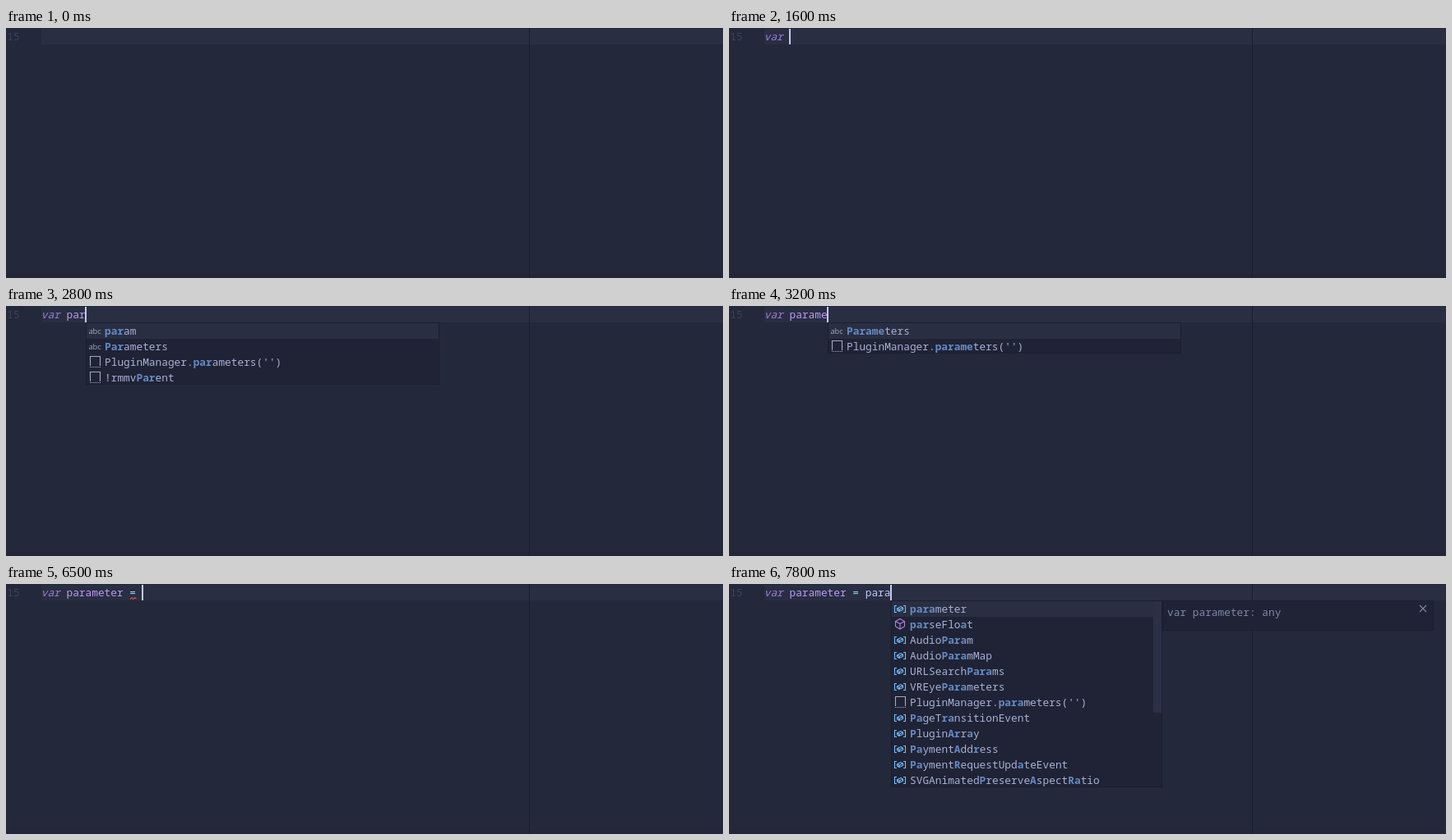
Write an HTML page that moves like this. It is 872 px wide and 305 px high and loops after 8000 ms.

```html
<!DOCTYPE html>
<html lang="en">
<head>
<meta charset="utf-8">
<title>Editor autocomplete</title>
<style>
  html, body { margin: 0; width: 100%; height: 100%; overflow: hidden; background: #24283b; }
  svg { display: block; }
  text { font: 12.82px "Noto Sans Mono", "DejaVu Sans Mono", monospace; white-space: pre; fill: #a9b1d6; }
  .hit { fill: #668ac4; font-weight: 700; }
  .keyword { fill: #9d7cd8; font-style: italic; }
  .name { fill: #bb9af7; }
  .operator { fill: #89ddff; }
  .plain { fill: #c0caf5; }
  .gutter { fill: #3b4261; }
  .faint { fill: #7f86aa; }
  .abc { font: 9.3px "Open Sans", sans-serif; fill: #a4a9c2; }
  .line { fill: none; stroke-width: 1.1; }
</style>
</head>
<body>
<svg width="872" height="305" viewBox="0 0 872 305">
  <rect width="872" height="305" fill="#24283b"/>
  <rect y="300" width="872" height="5" fill="#222638"/>
  <rect x="43" y="1" width="829" height="19" fill="#292e42"/>
  <rect x="636" width="1" height="305" fill="#1b1e2e"/>
  <text class="gutter" x="1.3" y="15">15</text>
  <g id="view"></g>
</svg>
<script>
const LOOP = 8000, LEFT = 42.7, CHAR = 7.69, ROW = 19, TOP = 20, MAX_ROWS = 12;
const view = document.getElementById('view');

const icons = {
  variable: `<path class="line" stroke="#75beff" d="M4 4.5H1.5v8H4M12 4.5h2.5v8H12M4.5 7.8 9 5.6 11.5 7v2.5L7 11.5 4.5 10zL7 9.2 11.5 7M7 9.2v2.3"/>`,
  type: `<path class="line" stroke="#ee9d28" stroke-width="1.3" d="M1.6 6 5.4 2.2 8 4.8 4.2 8.6zM6.5 6.2H11M8 6.2v5.3h2.5M10.6 6.2l2-2 1.8 1.8-2 2zM10.2 11.6l2-2 1.8 1.8-2 2z"/>`,
  keyword: `<path fill="#a4a9c2" d="M15 4h-5V3h5zM14 7h-2v1h2zM10 7H1v1h9zM12 13H1v1h11zM7 10H1v1h6zM15 10h-5v1h5zM8 2v3H1V2zM7 3H2v1h5z" fill-rule="evenodd" opacity=".8"/>`,
  snippet: `<path class="line" stroke="#a4a9c2" d="M2.5 13V1.5h12V13"/><path class="line" stroke="#a4a9c2" stroke-dasharray="1" d="M2 14.5h13"/>`,
  method: `<path class="line" stroke="#b180d7" stroke-width="1.2" d="M8 1.5 13.5 4.5v6.3L8 14 2.5 10.8V4.5zM2.5 4.5 8 7.6l5.5-3.1M8 7.6V14"/>`,
  word: `<text class="abc" x=".4" y="11.5">abc</text>`
};

const items = (kind, names) => names.split('|').map(name => ({ kind, name }));

const lists = {
  keyword: {
    scroll: 152,
    hint: 'var',
    items: [
      ...items('keyword', 'var'),
      ...items('variable', 'ValidityState'),
      ...items('type', 'VarDate'),
      ...items('variable', 'VBArray|IDBCursorWithValue'),
      ...items('snippet', '@type ListsVariable|@type variable'),
      ...items('variable', 'VRFrameData|VREyeParameters|VRDisplay|VRDisplayCapabilities|VRDisplayEvent|VRDisplayEventMap|VRStageParameters')
    ]
  },
  name: {
    items: [
      ...items('word', 'param|plugindesc|Parameters'),
      ...items('snippet', "PluginManager.parameters('')|!rmmvParent")
    ]
  },
  value: {
    scroll: 136,
    details: 'var parameter: any',
    items: [
      ...items('variable', 'parameter'),
      ...items('method', 'parseFloat'),
      ...items('variable', 'AudioParam|AudioParamMap|URLSearchParams|VREyeParameters'),
      ...items('snippet', "PluginManager.parameters('')"),
      ...items('variable', 'PageTransitionEvent|PluginArray|PaymentAddress|PaymentRequestUpdateEvent|SVGAnimatedPreserveAspectRatio')
    ]
  }
};

// time, typed text, cursor shown, suggestion list, error mark
const steps = [
  [0, '', 0],
  [200, '', 1],
  [700, '', 0],
  [1000, 'v', 1],
  [1100, 'v', 1, 'keyword'],
  [1200, 'va', 1, 'keyword'],
  [1500, 'var', 1, 'keyword'],
  [1600, 'var ', 1],
  [2000, 'var ', 0],
  [2400, 'var p', 1, 'name'],
  [2500, 'var pa', 1, 'name'],
  [2800, 'var par', 1, 'name'],
  [3000, 'var para', 1, 'name'],
  [3100, 'var param', 1, 'name'],
  [3200, 'var parame', 1, 'name'],
  [3500, 'var paramet', 1, 'name'],
  [3600, 'var paramete', 1, 'name'],
  [3800, 'var parameter', 1, 'name'],
  [4200, 'var parameter', 0, 'name'],
  [4700, 'var parameter', 1, 'name'],
  [5200, 'var parameter ', 1],
  [5700, 'var parameter ', 0],
  [6100, 'var parameter =', 1],
  [6400, 'var parameter = ', 1],
  [6500, 'var parameter = ', 1, '', 1],
  [7000, 'var parameter = p', 1, '', 1],
  [7100, 'var parameter = p', 1, 'value', 1],
  [7200, 'var parameter = pa', 1, 'value', 1],
  [7400, 'var parameter = par', 1, 'value', 1],
  [7700, 'var parameter = para', 1, 'value', 1],
  [7800, 'var parameter = para', 1, 'value']
];

const rect = (x, y, w, h, fill) => `<rect x="${x}" y="${y}" width="${w}" height="${h}" fill="${fill}"/>`;
const span = (cls, s) => `<tspan class="${cls}">${s}</tspan>`;
const column = n => LEFT + n * CHAR;

function subsequence(name, query) {
  const hits = [];
  let from = 0;
  for (const c of query) {
    const at = name.indexOf(c, from);
    if (at < 0) return null;
    hits.push(at);
    from = at + 1;
  }
  return hits;
}

// Whole run first, then scattered letters, then with the last two swapped.
function match(name, query) {
  const low = name.toLowerCase(), at = low.indexOf(query);
  if (at >= 0) return [...query].map((_, i) => at + i);
  const n = query.length;
  const swapped = query.slice(0, n - 2) + query.slice(n - 1) + query.slice(n - 2, n - 1);
  return subsequence(low, query) || (n > 2 ? subsequence(low, swapped) : null);
}

function marked(name, hits) {
  let out = '';
  for (let i = 0; i < name.length;) {
    const on = hits.includes(i);
    let end = i + 1;
    while (end < name.length && hits.includes(end) === on) end++;
    const part = name.slice(i, end);
    out += on ? span('hit', part) : part;
    i = end;
  }
  return out;
}

function codeLine(text) {
  if (!text.startsWith('var')) return span('plain', text);
  return span('keyword', 'var') + span('name', text.slice(3, 14)) +
    span('operator', text.slice(14, 15)) + span('plain', text.slice(15));
}

function frameBox(x, w, h) {
  return rect(x, TOP, w, h, '#1b1e2e') + rect(x + 1, TOP + 1, w - 2, h - 2, '#1f2335');
}

function popup(list, query, x) {
  const rows = list.items
    .map(item => ({ ...item, hits: match(item.name, query) }))
    .filter(item => item.hits)
    .slice(0, MAX_ROWS);
  const w = list.details ? 330 : 430, h = rows.length * ROW;
  let out = frameBox(x, w, h);
  out += `<svg x="${x + 1}" y="${TOP + 1}" width="${w - 2}" height="${h - 2}">`;
  out += rect(0, 0, w, ROW, '#292e42');
  if (list.scroll) out += rect(w - 12, 0, 10, list.scroll, '#2b3047');
  rows.forEach((row, i) => {
    const y = i * ROW;
    out += `<g transform="translate(2 ${y + 1})">${icons[row.kind]}</g>`;
    out += `<text x="22" y="${y + 14}">${marked(row.name, row.hits)}</text>`;
  });
  if (list.hint) out += `<text class="faint" x="${w - 12}" y="14" text-anchor="end">${list.hint}</text>`;
  out += '</svg>';
  if (list.details) {
    const left = x + w, cross = left + 317;
    out += frameBox(left, 330, 37);
    out += `<text class="faint" x="${left + 6}" y="39">${list.details}</text>`;
    out += `<path class="line" stroke="#7f86aa" d="M${cross - 4} 26l8 8m0-8l-8 8"/>`;
  }
  return out;
}

function draw([, text, cursor, list, error]) {
  const end = column(text.length);
  let out = `<text x="${LEFT}" y="15">${codeLine(text)}</text>`;
  if (error) out += '<path class="line" stroke="#db4b4b" d="M151 18.5l2-2 2 2 2-2 1.5 1.5"/>';
  if (list) out += popup(lists[list], text.split(' ').pop(), Math.round(end));
  if (cursor) out += rect(Math.max(43, Math.floor(end)), 1, 2, ROW, '#c0caf5');
  view.innerHTML = out;
}

let shown;
const start = performance.now();

function tick() {
  const t = (performance.now() - start) % LOOP;
  const step = steps.findLast(s => s[0] <= t);
  if (step !== shown) draw(shown = step);
  requestAnimationFrame(tick);
}
tick();
</script>
</body>
</html>
```
